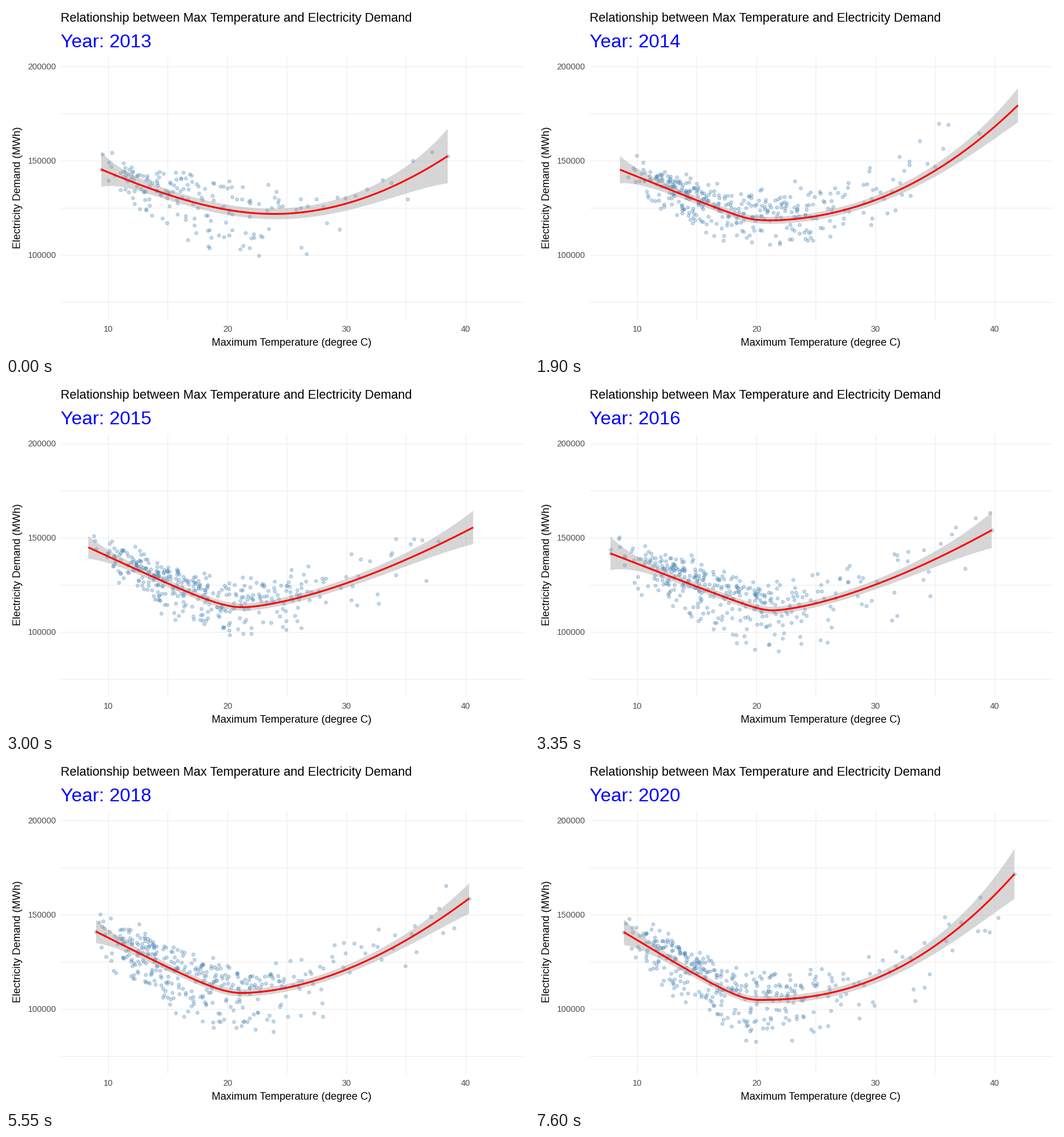
A matplotlib script for the animation above (8000 ms loop, 900 px wide and 600 px high).

```python
import numpy as np
import matplotlib.pyplot as plt
from matplotlib.animation import FuncAnimation

W, H, DPI = 900, 600, 100
STEP, LOOP = 50, 8000
PX = 72 / DPI  # points per pixel
STARTS = [750, 1850, 2950, 4050, 5150, 6250, 7300]
ENDS = [1050, 2150, 3350, 4350, 5550, 6550, 7600]

plt.rcParams["font.family"] = "Liberation Sans"


class Year:
    """One year of scatter points, trend line and confidence band, in pixels.

    The trend falls from start to low along a hyperbola with a rounded knee,
    then climbs to end as a power curve.
    """

    def __init__(self, year, start, low, end, power, flare, knee=.2):
        self.year, self.start, self.low, self.end = year, start, low, end
        self.power, self.knee = power, knee
        first_day = 181 if year == 2013 else 0
        days = 365 + (year % 4 == 0) - first_day

        s = np.linspace(0, 1, 80)
        mid = 6 * np.sqrt(365 / days)
        half = (mid + (flare[0] - mid) * np.exp(-s / .055)
                + (flare[1] - mid) * np.exp((s - 1) / .125))
        x = start[0] + (end[0] - start[0]) * s
        y = self.trend(x)
        self.curves = np.array([x, y, y - half, y + half])
        self.pts = self.scatter(days, first_day)

    def trend(self, x):
        (x0, y0), (xm, ym), (x1, y1) = self.start, self.low, self.end
        k = self.knee
        u = np.clip((xm - x) / (xm - x0), 0, 1)
        v = np.clip((x - xm) / (x1 - xm), 0, 1)
        fall = (np.hypot(u, k) - k) / (np.hypot(1, k) - k)
        return ym + (y0 - ym) * fall + (y1 - ym) * v**self.power

    def scatter(self, days, first_day):
        rng = np.random.default_rng(self.year)
        x0, x1, mild = self.start[0], self.end[0], 195
        # many mild days, with a thin cold tail and a long hot one
        u = np.linspace(0, 1, days)
        x = (mild + (x1 - mild) * (.3 * u + .25 * u**2 + .45 * u**20)
             - (mild - x0) * (1 - u)**30)
        x[1:-1] += rng.normal(0, 8, days - 2)
        x = np.sort(np.clip(x, x0, x1))

        # working days sit above the trend, weekends below it
        weekend = rng.random(days) < .32
        off = np.where(weekend, rng.normal(36, 17, days),
                       rng.normal(-17, 15, days))
        off *= .75 + .35 * np.clip((x - mild) / 150, 0, 1)
        off[[0, -1]] = 0
        pts = np.column_stack([x, self.trend(x) + np.clip(off, -50, 72)])

        # hand temperatures out by season, so rows run through the year
        day = np.arange(days) + first_day
        heat = np.cos(2 * np.pi * (day - 30) / 365) + rng.normal(0, .45, days)
        rows = np.empty_like(pts)
        rows[np.argsort(heat)] = pts
        return rows


years = [
    Year(2013, (164, 281), (462, 357.5), (760, 258), 1.95, (30, 47), knee=.8),
    Year(2014, (146.5, 282), (385, 362.5), (840, 140), 2.35, (26, 30), knee=.1),
    Year(2015, (145, 279.5), (405, 384.5), (809, 247), 1.5, (17, 28)),
    Year(2016, (130, 293), (409, 391), (786, 253), 1.5, (29, 31), knee=.1),
    Year(2017, (153, 283), (385, 400), (750, 255), 2.3, (20, 25)),
    Year(2018, (155, 295), (405, 400.5), (797, 238), 1.8, (20, 26)),
    Year(2019, (138, 289), (400, 402), (854, 176), 2.1, (23, 30)),
    Year(2020, (153, 296), (385, 412.5), (825, 196), 2.27, (22, 43)),
]

fig = plt.figure(figsize=(W / DPI, H / DPI), dpi=DPI, facecolor="white")
ax = fig.add_axes([0, 0, 1, 1])
ax.set(xlim=(0, W), ylim=(H, 0))
ax.axis("off")


def label(x, y, s, px, color="black", **kw):
    return ax.text(x, y, s, fontsize=px * PX, color=color, va="baseline", **kw)


def rule(xs, ys):
    ax.plot(xs, ys, color="#EBEBEB", lw=PX, zorder=1)


for k in range(7):
    rule([175.6 + 102.5 * k] * 2, [88, 539])
for k in range(6):
    rule([94, 890], [104 + 81 * k] * 2)
for k in range(4):
    label(176 + 205 * k, 560, f"{10 * (k + 1)}", 14.5, "#4D4D4D", ha="center")
for k in range(3):
    label(86.5, 109 + 162 * k, f"{200000 - 50000 * k}", 14.5, "#4D4D4D",
          ha="right")

label(94, 27, "Relationship between Max Temperature and Electricity Demand",
      21.55)
label(491.7, 584, "Maximum Temperature (degree C)", 17.95, ha="center")
label(25, 312.5, "Electricity Demand (MWh)", 18, ha="center", rotation=90,
      rotation_mode="anchor")
heading = label(94, 71, "", 32.5, "#0000FF")

steel = np.array([70, 130, 180]) / 255
dots, = ax.plot([], [], "o", ms=5.6 * PX, mew=PX, zorder=2,
                mfc=(*steel, .3), mec=(*steel, .4))
ribbon, = ax.fill([0, 1, 1], [0, 0, 1], color="#999999", alpha=.4, lw=0,
                  zorder=3)
line, = ax.plot([], [], color="#FF0000", lw=3 * PX, zorder=4,
                solid_capstyle="butt")


def phase(t):
    """Years being blended at time t, and how far along the blend is."""
    k = sum(t >= s for s in STARTS)
    if k == 0 or t >= ENDS[k - 1]:
        return years[k], years[k], 0
    s, e = STARTS[k - 1], ENDS[k - 1]
    return years[k - 1], years[k], (t - s + STEP) / (e - s + STEP)


def draw(i):
    a, b, p = phase(i * STEP)
    n = min(len(a.pts), len(b.pts))
    dots.set_data(*((1 - p) * a.pts[:n] + p * b.pts[:n]).T)
    x, y, top, low = (1 - p) * a.curves + p * b.curves
    line.set_data(x, y)
    ribbon.set_xy(np.column_stack([np.r_[x, x[::-1]], np.r_[top, low[::-1]]]))
    heading.set_text(f"Year: {(a if p < .5 else b).year}")
    return dots, ribbon, line, heading


anim = FuncAnimation(fig, draw, frames=LOOP // STEP, interval=STEP,
                     repeat=True, repeat_delay=0)
plt.show()
```
